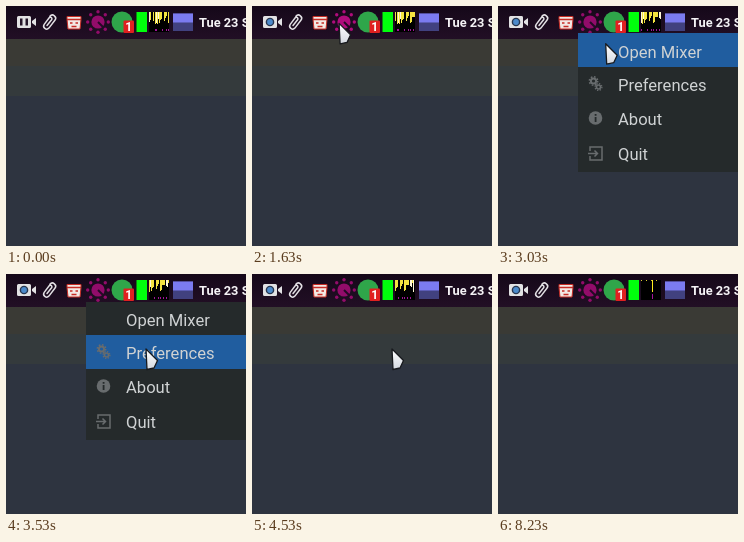
Write an HTML page that moves like this. It is 240 px wide and 240 px high and loops after 8.31 s.

```html
<!DOCTYPE html>
<html lang="en">
<head>
<meta charset="utf-8">
<title>Tray menu</title>
<style>
  html, body { margin: 0; width: 100%; height: 100%; overflow: hidden; background: #2e3440; }
  svg { display: block; width: 100vw; height: 100vh; }
  .clock { font: 700 12.8px Roboto, sans-serif; fill: #f4f2f5; }
  .item { font: 400 16.6px Roboto, sans-serif; fill: #cfd2d3; }
  .badge { font: 700 12px Roboto, sans-serif; fill: #fff; text-anchor: middle; }
</style>
</head>
<body>
<svg viewBox="0 0 240 240">
  <defs>
    <linearGradient id="bar" x2="0" y2="1">
      <stop stop-color="#150819"/><stop offset="1" stop-color="#220f25"/>
    </linearGradient>
    <linearGradient id="arrow" x2="0" y2="1">
      <stop stop-color="#fff"/><stop offset="1" stop-color="#d4d9e0"/>
    </linearGradient>
  </defs>

  <rect width="240" height="240" fill="#2e3440"/>
  <rect y="32" width="240" height="28" fill="#3a3a35"/>
  <rect y="60" width="240" height="30" fill="#343a3c"/>
  <rect width="240" height="33" fill="url(#bar)"/>

  <!-- camera -->
  <path d="M12.5 10h11a1.5 1.5 0 0 1 1.5 1.5v9a1.5 1.5 0 0 1-1.5 1.5h-11a1.5 1.5 0 0 1-1.5-1.5v-9a1.5 1.5 0 0 1 1.5-1.5zM26 15l4-3v8L26 17z" fill="#e2e2e4"/>
  <path id="paused" d="M14 12.500h2.500v7H14zM19.500 12.500H22v7h-2.500z" fill="#25162a"/>
  <g id="recording">
    <circle cx="18" cy="16" r="4.300" fill="#27364f"/>
    <circle cx="18" cy="16" r="2.900" fill="#4c8acb"/>
  </g>

  <!-- paperclip -->
  <path d="M41 18.500l4.600-5.800a1.500 1.500 0 0 0-2.400-1.900l-5 6.600a3 3 0 0 0 4.700 3.700l6-7.800a3.200 3.200 0 0 0-5-4" transform="translate(0 1)" fill="none" stroke="#e2e0e4" stroke-width="1.500" stroke-linecap="round"/>

  <!-- notes -->
  <path d="M61 10.500h14v3l-1 9.500H62l-1-9.500z" fill="#f3e9e4" stroke="#c62c25"/>
  <path d="M61 13.500h14M64 17h2.500M69.500 17H72M65.500 20.500h5" stroke="#c62c25" stroke-width="1.300"/>

  <!-- volume dial -->
  <g id="dial" fill="#920c6a">
    <circle cx="92" cy="16" r="6.600"/>
    <g id="dots"></g>
    <path d="M92 16l5 5" stroke="#240a25" stroke-width="2"/>
  </g>

  <!-- messages -->
  <circle cx="116" cy="16" r="10.500" fill="#2fa64a"/>
  <rect x="117.500" y="14.500" width="10.500" height="12.500" rx="1" fill="#e02020"/>
  <text class="badge" x="122.700" y="25">1</text>

  <!-- monitors -->
  <rect x="130.500" y="6" width="10.500" height="20" fill="#00ff0c"/>
  <rect x="143" y="6" width="20" height="20"/>
  <g id="graph" shape-rendering="crispEdges"></g>
  <rect x="167" y="7.500" width="20" height="17.500" fill="#41417f"/>
  <rect x="167" y="7.500" width="20" height="9" fill="#7b7bf0"/>

  <text class="clock" x="193" y="21">Tue 23 S</text>

  <g id="menu">
    <rect x="80" y="28" width="160" height="138" fill="#252a2b"/>
    <rect id="hover" x="80" width="160" height="34" fill="#205d9f"/>
    <g id="items"></g>
    <g fill="none" stroke="#686c6e">
      <circle cx="95.500" cy="75" r="2.600" stroke-width="2"/>
      <circle cx="95.500" cy="75" r="4.200" stroke-width="1.500" stroke-dasharray="1.650"/>
      <circle cx="100.500" cy="81" r="2" stroke-width="1.600"/>
      <circle cx="100.500" cy="81" r="3.400" stroke-width="1.300" stroke-dasharray="1.340"/>
      <path d="M92 145v-4h12v13H92v-4M90 147.500h9M96.500 144.500l3 3-3 3" stroke-width="1.500"/>
    </g>
    <circle cx="97.500" cy="112" r="6.800" fill="#686c6e"/>
    <path d="M96.700 108h1.800v1.800h-1.800zM96.700 111h1.800v5h-1.800z" fill="#252a2b"/>
  </g>

  <path id="cursor" d="M0 0L11.500 11.500L8 19L1 20.500Z" fill="url(#arrow)" stroke="#17191d" stroke-width="1.300" stroke-linejoin="round"/>
</svg>
<script>
const LOOP = 8310, STEP = 444, MENU = [2070, 3760], RESCALE = 5551;
const ROW_TOP = 27, ROW_HEIGHT = 34;
const NS = 'http://www.w3.org/2000/svg';
const $ = id => document.getElementById(id);

function add(parent, tag, attrs, text) {
  const el = document.createElementNS(NS, tag);
  for (const name in attrs) el.setAttribute(name, attrs[name]);
  if (text) el.textContent = text;
  parent.append(el);
  return el;
}

const show = (id, on) => { $(id).style.display = on ? '' : 'none'; };

for (let i = 0; i < 8; i++) {
  const a = i * Math.PI / 4;
  add($('dots'), 'circle', { cx: 92 + 10.3 * Math.cos(a), cy: 16 + 10.3 * Math.sin(a), r: 1.7 });
}

const items = { 'Open Mixer': 52, Preferences: 85, About: 119, Quit: 154 };
for (const label in items) add($('items'), 'text', { class: 'item', x: 120, y: items[label] }, label);

// Repeatable noise in 0..1 for sample n
function noise(n, salt) {
  const v = Math.sin(n * 12.9898 + salt * 78.233) * 43758.5453;
  return v - Math.floor(v);
}

function drawGraph(shift) {
  const dense = shift < Math.floor((RESCALE - 5995) / STEP);
  const bar = (x, y, height, fill) => add($('graph'), 'rect', { x, y, width: 1, height, fill });
  $('graph').replaceChildren();
  for (let i = 0; i < 20; i++) {
    const n = i + shift, x = 143 + i;
    if (n === 16) {
      bar(x, 6, dense ? 17 : 12, '#ffee20');
      bar(x, 20, 5, '#a0149a');
    } else if (dense) {
      const r = noise(n, 1);
      if (r > 0.4) bar(x, 6, 1 + Math.round(r * r * 15), noise(n, 2) > 0.6 ? '#fff8d8' : '#f4e440');
      if (noise(n, 3) > 0.7) bar(x, 23, 2, '#a0149a');
    } else if (n % 5 === 0 && i < 17) {
      bar(x, 6, 1, '#d8cc30');
    }
  }
}

// time, x, y, easing of the leg that ends here
const linear = p => p, out = p => 1 - (1 - p) ** 3, both = p => p * p * (3 - 2 * p);
const path = [
  [1130, -13, 99, linear],
  [1600, 87, 17.5, out],
  [1800, 88.5, 15.5, both],
  [2770, 88.5, 15.5, linear],
  [3400, 140, 75, both],
  [5000, 140, 75, linear],
  [5330, -13, 128, both]
];

function cursorAt(t) {
  const i = path.findIndex(p => p[0] > t);
  if (i < 1) return null;
  const [t0, x0, y0] = path[i - 1], [t1, x1, y1, ease] = path[i];
  const p = ease((t - t0) / (t1 - t0));
  return [x0 + (x1 - x0) * p, y0 + (y1 - y0) * p];
}

let lastShift;
function draw(t) {
  show('paused', t < 30);
  show('recording', t >= 30);

  const pos = cursorAt(t);
  show('cursor', pos);
  if (pos) $('cursor').setAttribute('transform', `translate(${pos})`);

  const open = t >= MENU[0] && t < MENU[1];
  show('menu', open);
  const row = pos ? Math.floor((pos[1] - ROW_TOP) / ROW_HEIGHT) : -1;
  show('hover', row >= 0);
  $('hover').setAttribute('y', ROW_TOP + row * ROW_HEIGHT);

  const over = pos && pos[1] < ROW_TOP && pos[0] > 80 && pos[0] < 104;
  $('dial').setAttribute('fill', over ? '#b00c7c' : '#920c6a');

  const shift = Math.floor((t - 5995) / STEP);
  if (shift !== lastShift) {
    lastShift = shift;
    drawGraph(shift);
  }
}

const start = performance.now();
function tick() {
  draw((performance.now() - start) % LOOP);
  requestAnimationFrame(tick);
}
tick();
</script>
</body>
</html>
```
